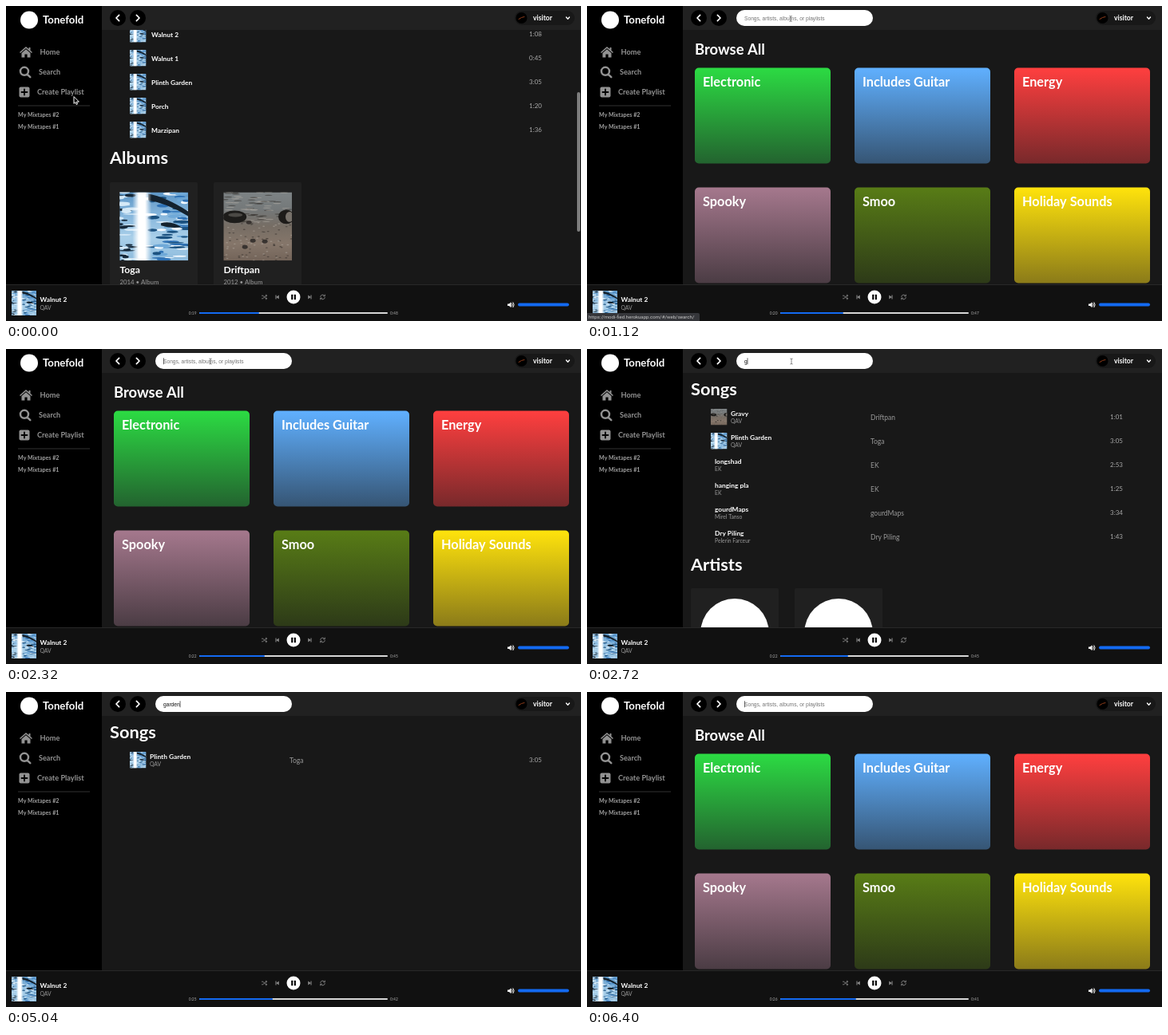
These frames come from a looping animation (720x395 px, 6480 ms). An HTML page with a canvas:

```html
<!DOCTYPE html>
<html lang="en">
<head>
<meta charset="utf-8">
<title>Music player</title>
<style>
  html, body { margin: 0; height: 100%; overflow: hidden; background: #000; }
  canvas { display: block; width: 100vw; height: 100vh; }
</style>
</head>
<body>
<canvas id="stage"></canvas>
<script>
const LOOP = 6480, FRAME = 80, W = 720, H = 395;
const canvas = document.getElementById('stage');
const ctx = canvas.getContext('2d');
const ratio = window.devicePixelRatio || 1;
canvas.width = W * ratio;
canvas.height = H * ratio;

const LATO = 'Lato, sans-serif', ARIAL = '"Liberation Sans", Arial, sans-serif';
const GREY = '#929292', BLUE = '#136af2';

// Each step is [start time, value]; the latest one reached counts.
const PAGE = [[0, 'home'], [480, 'browse'], [2640, 'results'], [6400, 'browse']];
const QUERY = [[0, ''], [2640, 'g'], [2960, 'ga'], [3280, 'gar'], [3520, 'gard'],
  [3760, 'garde'], [3920, 'garden'], [6400, '']];
const CARET = [[0, 0], [1520, 1], [2000, 0], [2320, 1], [4480, 0], [4960, 1], [5440, 0], [6400, 1]];
const SECONDS = [[0, 19], [640, 20], [1520, 21], [2000, 22], [3040, 23], [4000, 24], [4960, 25], [6000, 26]];
const PLAYED = [[0, 317], [720, 321], [2000, 324], [2480, 327], [3520, 331], [4480, 334], [6000, 337]];
const POINTER = [[0, 85, 114], [320, 50, 86], [560, 50, 86], [1040, 255, 16], [1680, 256, 15.5]];

const HOME_SONGS = [['Walnut 2', '1:08'], ['Walnut 1', '0:45'], ['Plinth Garden', '3:05'],
  ['Porch', '1:20'], ['Marzipan', '1:36']];
const GARDEN = ['Plinth Garden', 'QAV', 'Toga', '3:05', cover];
const MATCHES = [['Gravy', 'QAV', 'Driftpan', '1:01', beach], GARDEN,
  ['longshad', 'EK', 'EK', '2:53'], ['hanging pla', 'EK', 'EK', '1:25'],
  ['gourdMaps', 'Mirel Tanso', 'gourdMaps', '3:34'],
  ['Dry Piling', 'Pelerin Farceur', 'Dry Piling', '1:43']];
const GENRES = [['Electronic', '#2cdb43', '#23632f'], ['Includes Guitar', '#60b0ff', '#365574'],
  ['Energy', '#ff3f3f', '#78292b'], ['Spooky', '#a5788d', '#4b3c44'],
  ['Smoo', '#587c16', '#2d3a18'], ['Holiday Sounds', '#ffe30c', '#8b7b19']];

const at = (steps, t) => steps.findLast(s => s[0] <= t)[1];

function randomizer(seed) {
  return () => (seed = seed * 16807 % 2147483647) / 2147483647;
}

function rect(x, y, w, h, fill, radius = 0) {
  ctx.fillStyle = fill;
  ctx.beginPath();
  ctx.roundRect(x, y, w, h, radius);
  ctx.fill();
}

function ellipse(x, y, rx, ry, fill) {
  ctx.fillStyle = fill;
  ctx.beginPath();
  ctx.ellipse(x, y, rx, ry, 0, 0, 7);
  ctx.fill();
}

const disc = (x, y, r, fill) => ellipse(x, y, r, r, fill);

// y is the middle of the capitals.
function text(str, x, y, size, color = '#fff', weight = 700, font = LATO) {
  ctx.font = `${weight} ${size}px ${font}`;
  ctx.fillStyle = color;
  ctx.fillText(str, x, y + size * 0.36);
}

const heading = (str, y) => text(str, 130, y + 0.5, 21.8);

function shape(d, x, y, fill, stroke, width = 1) {
  const path = new Path2D(d);
  ctx.save();
  ctx.translate(x, y);
  if (fill) { ctx.fillStyle = fill; ctx.fill(path); }
  if (stroke) {
    ctx.strokeStyle = stroke;
    ctx.lineWidth = width;
    ctx.lineCap = ctx.lineJoin = 'round';
    ctx.stroke(path);
  }
  ctx.restore();
}

function gradient(x0, y0, x1, y1, ...colors) {
  const g = ctx.createLinearGradient(x0, y0, x1, y1);
  colors.forEach((c, i) => g.addColorStop(i / (colors.length - 1), c));
  return g;
}

function picture(x, y, size, paint) {
  ctx.save();
  ctx.translate(x, y);
  ctx.scale(size / 86, size / 86);
  ctx.beginPath();
  ctx.rect(0, 0, 86, 86);
  ctx.clip();
  paint();
  ctx.restore();
}

function cover() {
  const random = randomizer(11);
  rect(0, 0, 86, 86, gradient(0, 0, 0, 86, '#5d96c6', '#86b6dc', '#a9cfe9', '#8dbbdd'));
  const tones = ['#16293a', '#f2f9ff', '#2f72b5', '#d5e9f7', '#1c5280', '#6fa9d8'];
  for (let i = 0; i < 110; i++) {
    const x = i % 3 ? 34 + random() * 52 : random() * 22 - 6;
    ellipse(x, random() * 86, 3 + random() * 9, 0.7 + random() * 1.6, tones[i % 6]);
  }
  shape('M36 2Q58 6 86 24V30Q60 14 36 10ZM52 39Q64 35 78 44Q64 46 52 42Z', 0, 0, '#14222e');
  rect(16, 0, 24, 86, gradient(16, 0, 40, 0, 'rgba(255,255,255,0)', '#fff', '#fff', 'rgba(255,255,255,0)'));
}

function beach() {
  const random = randomizer(5);
  rect(0, 0, 86, 86, gradient(0, 0, 0, 86, '#7d8385', '#747879', '#766d64', '#85766a', '#736459'));
  for (let i = 0; i < 160; i++) {
    const y = random() * 86, w = y < 38 ? 5 : 1.5;
    ellipse(random() * 86, y, w, 0.7, i % 2 ? 'rgba(45,40,36,.5)' : 'rgba(185,178,168,.45)');
  }
  ellipse(14, 31, 15, 8, '#1d1c1a');
  ellipse(15, 28.5, 9, 2.5, '#4b4945');
  ellipse(79, 31, 10, 9, '#1d1b19');
  ellipse(83, 31, 5, 6.5, '#77716a');
  [[32, 38], [37, 61], [52, 62], [27, 69]].forEach(p => ellipse(...p, 3.5, 2.5, '#383330'));
}

function albumCard(x, y, title, year, paint) {
  rect(x, y, 110, 150, '#202020', 2);
  picture(x + 12.3, y + 12.5, 85.7, paint);
  text(title, x + 12.5, y + 109.5, 12.2);
  text(`${year} • Album`, x + 12.5, y + 125, 7.8, '#999', 400);
}

function drawHome() {
  HOME_SONGS.forEach(([title, length], i) => {
    const y = 35 + i * 30;
    picture(155, y - 10, 20.5, cover);
    text(title, 182, y + 0.5, 8.4);
    text(length, 655, y + 0.5, 8, '#aaa', 400);
  });
  heading('Albums', 190);
  albumCard(130, 221, 'Toga', 2014, cover);
  albumCard(260, 221, 'Driftpan', 2012, beach);
  rect(715, 108, 4, 175, '#7d7d7d', 2);
}

function drawBrowse() {
  text('Browse All', 135, 54.5, 18.4);
  GENRES.forEach(([name, top, bottom], i) => {
    const x = 135 + i % 3 * 200, y = i < 3 ? 77.5 : 227.5;
    rect(x, y, 170, 120, gradient(0, y, 0, y + 120, top, bottom), 5);
    text(name, x + 10, y + 18, 16.3);
  });
}

function drawResults(query) {
  heading('Songs', 50);
  (query === 'g' ? MATCHES : [GARDEN]).forEach(([title, artist, album, length, paint], i) => {
    const y = 85 + i * 30, x = paint ? 180 : 160;
    if (paint) picture(155, y - 10, 20.5, paint);
    text(title, x, y - 4, 8.4);
    text(artist, x, y + 6, 6.8, '#999', 400);
    text(album, 355, y + 0.5, 8.5, '#999', 400);
    text(length, 655, y + 0.5, 8, '#aaa', 400);
  });
  if (query === 'g') {
    heading('Artists', 270);
    [130, 260].forEach(x => {
      rect(x, 300, 110, 150, '#202020', 2);
      disc(x + 55, 355.8, 42.8, '#fff');
    });
  }
  if (query === 'ga') {
    heading('Albums', 120);
    albumCard(130, 150, 'Toga', 2014, cover);
  }
}

function drawSearchField(query, caret, selected) {
  rect(187, 5, 171, 20, '#fff', 10);
  ctx.font = `400 6.67px ${ARIAL}`;
  const width = ctx.measureText(query).width;
  if (selected) rect(197, 11, width, 9, '#b4d5fe');
  if (query) text(query, 197, 15.2, 6.67, '#111', 400, ARIAL);
  else text('Songs, artists, albums, or playlists', 197, 15.2, 6.67, '#757575', 400, ARIAL);
  if (caret) rect(197 + width, 11.2, 0.6, 8, '#000');
}

function drawHeader() {
  rect(120, 0, 600, 30, '#212121');
  disc(140, 15, 10, '#000');
  disc(165, 15, 10, '#000');
  shape('M1.6 -3.6L-2 0L1.6 3.6', 140, 15, null, '#fff', 1.7);
  shape('M-1.6 -3.6L2 0L-1.6 3.6', 165, 15, null, '#fff', 1.7);
  rect(637, 6, 75, 18, '#181818', 9);
  disc(645.5, 15, 7, '#000');
  shape('M-3.5 1.5Q0 -1.2 3.5 -1.5', 645.5, 15, null, '#8f3c1a', 1);
  text('visitor', 660, 15.2, 8.6);
  shape('M-2 -1L0 1.2L2 -1', 703.5, 15, null, '#fff', 1.4);
}

function drawSidebar() {
  rect(0, 0, 120, 350, '#000');
  disc(29, 17.5, 11, '#fff');
  text('Tonefold', 46, 17, 13.2);
  shape('M-8 0L0 -7L3.5 -4V-6H5.5V-2.2L8 0L7 1L0 -5L-7 1ZM-5.5 1L0 -3.8L5.5 1V6.5H1.6V2.5H-1.6V6.5H-5.5Z', 25, 58, GREY);
  shape('M4 -1.2A5 5 0 1 1 -6 -1.2A5 5 0 1 1 4 -1.2M2.8 2.8L6.3 6.2', 24, 83, null, GREY, 2.5);
  rect(16.5, 101.5, 13, 13, GREY, 2);
  shape('M-3.5 0H3.5M0 -3.5V3.5', 23, 108, null, '#000', 1.8);
  text('Home', 42.5, 57.5, 9.2, GREY);
  text('Search', 41, 82.5, 9.1, GREY);
  text('Create Playlist', 39, 107.5, 9.2, GREY);
  rect(15, 124.5, 90, 1, '#333');
  text('My Mixtapes #2', 15, 136.5, 7.1, '#a0a0a0');
  text('My Mixtapes #1', 15, 151.5, 7.1, '#a0a0a0');
}

function drawFooter(t) {
  rect(0, 349, W, 46, '#111');
  rect(0, 349, W, 1, '#282828');
  picture(7, 357, 31, cover);
  text('Walnut 2', 42.5, 368, 8.3);
  text('QAV', 42.5, 378.5, 6.8, '#999', 400);

  shape('M-3 -1.8H-1.6L1.6 1.8H3M-3 1.8H-1.6L1.6 -1.8H3M2 -2.8L3.2 -1.8L2 -.8M2 .8L3.2 1.8L2 2.8', 323.5, 365, null, GREY, 0.8);
  shape('M-2 -2.5H-1V2.5H-2ZM2.2 -2.5V2.5L-1 0Z', 339.5, 365, GREY);
  disc(360, 365, 8.5, '#fff');
  rect(357.2, 361.7, 2.1, 6.6, '#000', 0.5);
  rect(360.8, 361.7, 2.1, 6.6, '#000', 0.5);
  shape('M2 -2.5H1V2.5H2ZM-2.2 -2.5V2.5L1 0Z', 380.5, 365, GREY);
  shape('M-2.8 -.5A2.8 2.8 0 0 1 2.4 -1.5M2.8 .5A2.8 2.8 0 0 1 -2.4 1.5M2.8 -3V-1.2H1M-2.8 3V1.2H-1', 396.5, 365, null, GREY, 0.8);

  const seconds = at(SECONDS, t), played = at(PLAYED, t);
  text(`0:${seconds}`, 228.8, 385, 4.9, '#aaa', 400);
  text(`0:${67 - seconds}`, 481, 385, 4.9, '#aaa', 400);
  rect(242, 384, 236, 2, '#d6d6d6', 1);
  rect(242, 384, played - 242, 2, BLUE, 1);

  shape('M-4 -1.3H-2L.5 -3.5V3.5L-2 1.3H-4Z', 632, 374.7, '#fff');
  shape('M1.8 -1.5Q3 0 1.8 1.5M3 -3Q5.5 0 3 3', 632, 374.7, null, '#fff', 1);
  rect(641, 372.5, 64, 4, BLUE, 2);
}

function drawPointer(t) {
  const next = POINTER.findIndex(p => p[0] > t);
  const b = POINTER.at(next), a = POINTER.at(next < 0 ? -1 : next - 1);
  const k = next < 0 ? 0 : (t - a[0]) / (b[0] - a[0]);
  const ease = k * k * (3 - 2 * k);
  const x = a[1] + (b[1] - a[1]) * ease, y = a[2] + (b[2] - a[2]) * ease;
  if (x > 187 && y < 26) {
    shape('M-1.2 -3.5Q0 -3.5 0 -2.6Q0 -3.5 1.2 -3.5M0 -2.6V2.6M-1.2 3.5Q0 3.5 0 2.6Q0 3.5 1.2 3.5', x, y, null, '#555', 0.7);
  } else {
    shape('M0 0V8.4L1.9 6.6L3.1 9.5L4.6 8.8L3.4 6.1H6Z', x, y, '#000', '#fff', 1);
  }
}

function draw(t) {
  const page = at(PAGE, t), query = at(QUERY, t);
  ctx.setTransform(canvas.width / W, 0, 0, canvas.height / H, 0, 0);
  rect(0, 0, W, H, '#181818');
  if (page === 'home') drawHome();
  if (page === 'browse') drawBrowse();
  if (page === 'results') drawResults(query);
  drawHeader();
  if (page !== 'home') drawSearchField(query, at(CARET, t), t >= 5440 && t < 6400);
  drawSidebar();
  drawFooter(t);
  if (t >= 240 && t < 1440) {
    rect(0, 385, 141, 10, '#35363a', [0, 2, 0, 0]);
    text('https://modi-fied.herokuapp.com/#/web/search/', 2, 390, 6.1, '#c8c8c8', 400, 'Roboto, sans-serif');
  }
  if (t < 2800) drawPointer(t);
}

function tick(now) {
  draw(Math.floor(now % LOOP / FRAME) * FRAME);
  requestAnimationFrame(tick);
}
requestAnimationFrame(tick);
</script>
</body>
</html>
```
